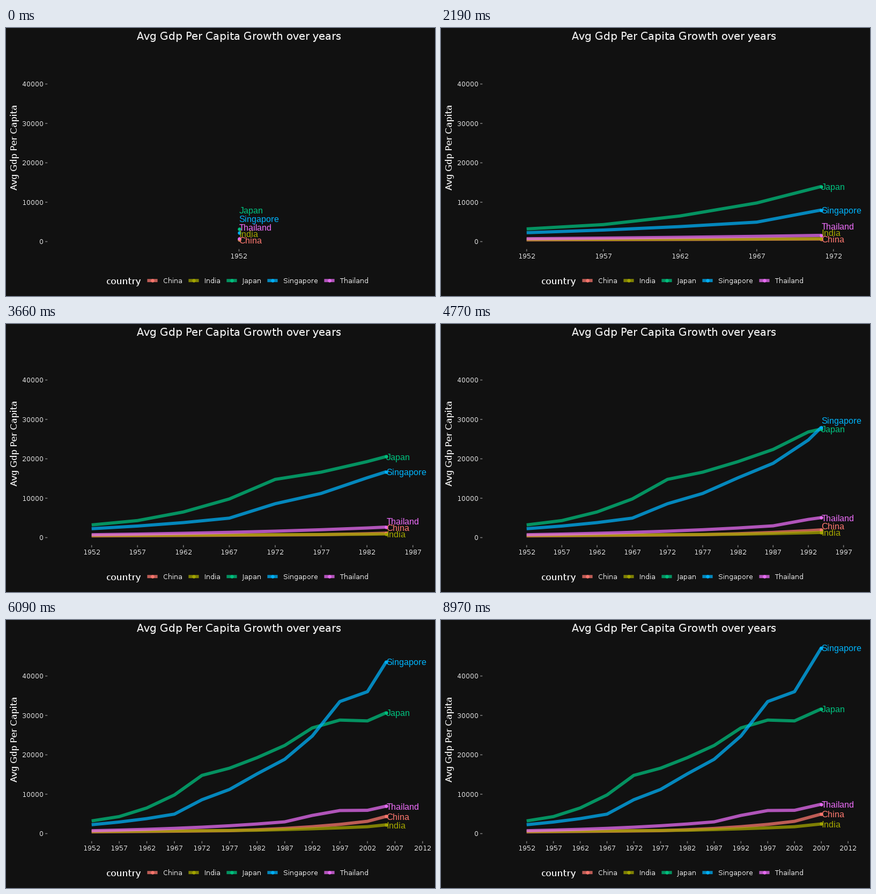
These frames come from a looping animation (800x500 px, 9000 ms). A matplotlib script:

```python
import numpy as np
import matplotlib as mpl
import matplotlib.pyplot as plt
from matplotlib.animation import FuncAnimation

# Whole-pixel glyph advances with the fonts' own hinting
mpl.rcParams["text.hinting"] = "default"
mpl.rcParams["text.hinting_factor"] = 1
mpl.rcParams["toolbar"] = "None"

W, H, DPI = 800, 500, 100
PX = 72 / DPI                             # points per pixel
FRAMES, REVEAL, INTERVAL = 300, 209, 30

BG, INK, TICK = "#111111", "#EEEEEE", "#7A7A7A"
LEFT, RIGHT, BOTTOM = 77.3, 791.7, 412.6  # panel edges
X0, X1 = 159.7, 709.2                     # first year and current year
XMID = (LEFT + RIGHT) / 2
LEGEND_Y = 471.2
CAP, DESCENT = 12, 4                      # label box heights

START, END, STEP = 1952, 2007, 5
YEARS = np.arange(START, END + 1, STEP)
BREAKS = np.arange(START, END + STEP + 1, STEP)

# Turning points; growth is at a constant rate between them
TURNS = {
    "China": {1952: 440, 1977: 741, 2002: 3119, 2007: 4959},
    "India": {1952: 547, 1982: 856, 2002: 1747, 2007: 2452},
    "Japan": {1952: 3217, 1957: 4318, 1972: 14779, 1977: 16610, 1987: 22376,
              1992: 26825, 1997: 28817, 2002: 28605, 2007: 31656},
    "Singapore": {1952: 2260, 1967: 4940, 1972: 8598, 1977: 11210, 1982: 15169,
                  1987: 18862, 1992: 24770, 1997: 33519, 2002: 36023, 2007: 47143},
    "Thailand": {1952: 730, 1987: 2983, 1992: 4617, 1997: 5853, 2002: 5913,
                 2007: 7458},
}
GDP = {name: np.exp(np.interp(YEARS, list(t), np.log(list(t.values()))))
       for name, t in TURNS.items()}
COLORS = dict(zip(GDP, ["#F8766D", "#A3A500", "#00BF7D", "#00B0F6", "#E76BF3"]))

fig = plt.figure(figsize=(W / DPI, H / DPI), dpi=DPI, facecolor=BG)
ax = fig.add_axes([0, 0, 1, 1])
ax.set(xlim=(0, W), ylim=(H, 0))
ax.axis("off")


def y_of(value):
    return 398.5 - 0.00735 * np.asarray(value)


def text(x, y, s, size, color=INK, font="DejaVu Sans", va="baseline", **kw):
    return ax.text(x, y, s, fontsize=size * PX, color=color, family=font,
                   va=va, **kw)


def stroke(xs, ys, color, width, **kw):
    return ax.plot(xs, ys, color=color, lw=width * PX, solid_capstyle="butt",
                   solid_joinstyle="round", snap=False, **kw)[0]


def dot(x, y, color):
    return ax.plot([x], [y], "o", color=color, ms=6.4 * PX, mew=0,
                   snap=False, zorder=4)[0]


# Title and value axis
text(XMID, 22, "Avg Gdp Per Capita Growth over years", 20, ha="center")
text(8, 223, "Avg Gdp Per Capita", 17, rotation=90, va="center")
for v in range(0, 40001, 10000):
    text(70, y_of(v) + 4.7, str(v), 13, ha="right")
    stroke([LEFT - 4.2, LEFT], [y_of(v)] * 2, TICK, 1.6)

# Legend, laid out left to right
text(187, 478, "country", 17)
x = 263
for name, color in COLORS.items():
    stroke([x + 0.4, x + 19.6], [LEGEND_Y] * 2, color, 5.93, alpha=0.75)
    dot(x + 10, LEGEND_Y, color)
    entry = text(x + 30, 476, name, 13)
    x += 41 + entry.get_window_extent().width

# Moving parts
ticks = [(stroke([0, 0], [BOTTOM, BOTTOM + 4.2], TICK, 1.6),
          text(0, 429.6, str(b), 13, ha="center")) for b in BREAKS]
lines = {n: stroke([], [], c, 5.93, alpha=0.75, zorder=3)
         for n, c in COLORS.items()}
dots = {n: dot(0, 0, c) for n, c in COLORS.items()}
labels = {n: text(0, 0, n, 17, c, "Liberation Sans", zorder=5)
          for n, c in COLORS.items()}


def stack_labels(heads, x):
    """Lowest label stays on its point; those above are pushed up if they touch."""
    below = np.inf
    for name in sorted(heads, key=heads.get, reverse=True):
        height = CAP + (DESCENT if "p" in name else 0)
        below = min(heads[name], below - height)
        labels[name].set_position((x, below + 6.4))


def update(i):
    span = (END - START) * min(i, REVEAL) / REVEAL
    now = START + span

    def x_of(year):
        year = np.asarray(year)
        if span == 0:
            return np.where(year == START, XMID, 2 * W)
        return X0 + (X1 - X0) * (year - START) / span

    for b, (mark, label) in zip(BREAKS, ticks):
        x = float(x_of(b))
        mark.set_xdata([x, x])
        label.set_x(x)
        mark.set_visible(x <= RIGHT)
        label.set_visible(x <= RIGHT)

    past = YEARS < now - 1e-9
    xs = x_of(np.append(YEARS[past], now))
    heads = {}
    for name, gdp in GDP.items():
        ys = y_of(np.append(gdp[past], np.interp(now, YEARS, gdp)))
        lines[name].set_data(xs, ys)
        dots[name].set_data(xs[-1:], ys[-1:])
        heads[name] = float(ys[-1])
    stack_labels(heads, float(xs[-1]))
    return []


anim = FuncAnimation(fig, update, frames=FRAMES, init_func=lambda: update(0),
                     interval=INTERVAL, repeat=True, repeat_delay=0,
                     cache_frame_data=False)
plt.show()
```
